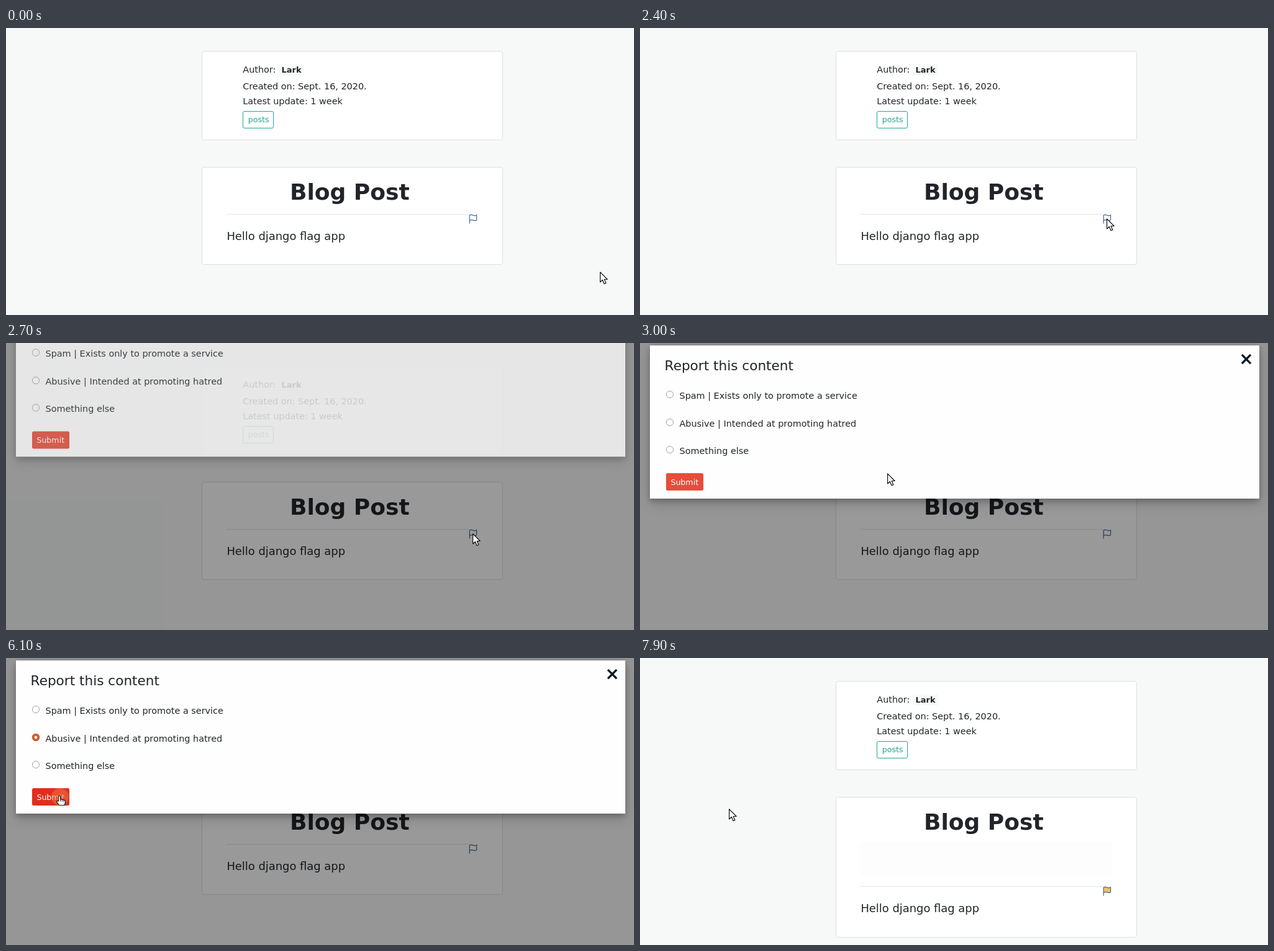
An HTML page for the animation above (8 s loop, 1011 px wide and 463 px high).

```html
<!DOCTYPE html>
<html lang="en">
<head>
<meta charset="utf-8">
<title>Report dialog</title>
<style>
  html, body { margin: 0; width: 100%; height: 100%; overflow: hidden; background: #f7f9f8; }
  svg { display: block; width: 1011px; height: 463px; }
  text { font: 14.4px "DejaVu Sans", sans-serif; fill: #212529; }
  .bold { font-weight: bold; }
  .small { font-size: 12.6px; }
  .card { fill: #fff; stroke: #dfdfdf; }
  .radio { fill: #fff; stroke: #a3a3a3; }
  #sheet { filter: drop-shadow(0 4px 4px rgba(0,0,0,.2)) drop-shadow(0 6px 10px rgba(0,0,0,.19)); }
  #ripple circle { fill: #f07746; }
  #arrow, #hand { fill: #fff; stroke: #111; stroke-linejoin: round; }
</style>
</head>
<body>
<svg viewBox="0 0 1011 463">
  <rect class="card" x="315.5" y="37.5" width="484" height="143" rx="3.5"/>
  <text x="381.3" y="72">Author:</text>
  <rect x="439" y="58" width="41" height="19" rx="3" fill="#f8f9fa"/>
  <text class="bold" x="443.5" y="72" style="font-size:13px">Lark</text>
  <text x="381.2" y="99">Created on: Sept. 16, 2020.</text>
  <text x="381.2" y="123">Latest update: 1 week</text>
  <rect x="381.5" y="134.5" width="49" height="27" rx="2.5" fill="#fff" stroke="#22a593"/>
  <text class="small" x="389.7" y="152" style="fill:#22a593">posts</text>

  <rect class="card" id="post" x="315.5" y="224.5" width="484" height="157" rx="3.5"/>
  <text class="bold" x="649.6" y="277" text-anchor="end" style="font-size:36px">Blog Post</text>
  <rect id="info" x="355" y="297" width="405" height="55" rx="3"/>
  <g id="content">
    <path d="M355 300.5H745" stroke="#e2e4e4"/>
    <path id="flag" d="M746.3 315.5V302C749 300.7 751 301.6 752.5 302.3S756.5 302.6 757.6 301.6V309.8C756 311 754 310.7 752.5 310.1S749 309.2 746.3 310.4"
      fill="none" stroke="#42698f" stroke-width="1.2"/>
    <text x="355.4" y="342" style="font-size:17.9px">Hello django flag app</text>
  </g>

  <rect id="shade" width="1011" height="463" fill="#000" fill-opacity=".4"/>
  <g id="modal">
    <rect id="sheet" x="16" y="4" width="981" height="247" fill="#fefefe"/>
    <text x="39.6" y="44" style="font-size:21.6px">Report this content</text>
    <text class="bold" x="976" y="35" text-anchor="middle" style="font-size:28px;fill:#0b1720">×</text>
    <g id="options"></g>
    <g id="checked">
      <circle cx="48" cy="128" r="6.2" fill="#d0602f"/>
      <circle cx="48" cy="128" r="2.2" fill="#fff"/>
    </g>
    <rect id="focus" x="39.5" y="207.5" width="65" height="33" rx="4" fill="#f2ab9c"/>
    <rect id="submit" x="42" y="210" width="60" height="28" rx="2.5"/>
    <text class="small" x="49.4" y="229" style="fill:#fff">Submit</text>
  </g>

  <g id="ripple"><circle id="ring"/><circle id="disc" r="14"/></g>
  <path id="arrow" d="M.6 .8V17L4.4 13.5L7 19.8L9.8 18.6L7.2 12.5H12.2Z" stroke-width="1.2"/>
  <g id="hand">
    <path d="M-1.5 9V1.8Q-1.5 .5 0 .5T1.5 1.8V6Q3.2 5 4.2 6.5Q5.8 5.6 6.8 7.2Q9.4 6.8 9.4 9.2V12L8 15.5H-.5L-4.2 10.6Q-5 8.4-3 8.5Z" stroke-width="1.2"/>
    <path d="M1.5 6V9.5M4.2 6.5V9.8M6.8 7.2V10" stroke-width=".9"/>
  </g>
</svg>
<script>
const $ = id => document.getElementById(id);
const set = (id, attrs) => { for (const k in attrs) $(id).setAttribute(k, attrs[k]); };
const show = (id, on) => set(id, { visibility: on ? "visible" : "hidden" });
const clamp = v => Math.max(0, Math.min(1, v));
const span = (t, start, end) => clamp((t - start) / (end - start));
const easeOut = (k, power) => 1 - (1 - k) ** power;

const LOOP = 8000, STEP = 100;
const OPEN = 2500, PICK = 4500, FOCUS = 6800, CLOSE = 7800;
const PRESSES = [1700, 4200, 6100], RIPPLE = 650;

// The pointer glides to each place in turn.
const HOME = { x: 956, y: 393 };
const GLIDES = [
  { start: 0, end: 1200, x: 750, y: 311 },
  { start: 1300, end: 1700, x: 751, y: 307 },
  { start: 2700, end: 3400, x: 130, y: 136 },
  { start: 3500, end: 3800, x: 48, y: 129 },
  { start: 5100, end: 5700, x: 86, y: 222 },
  { start: FOCUS, end: 7000, x: 92, y: 225 },
  { start: 7200, end: 7900, x: 143, y: 243 }
];

$("options").innerHTML = [
  "Spam | Exists only to promote a service",
  "Abusive | Intended at promoting hatred",
  "Something else"
].map((label, i) => {
  const y = Math.round(83 + 44.6 * i);
  return `<circle class="radio" cx="48" cy="${y}" r="5.6"/><text x="63.5" y="${y + 7}">${label}</text>`;
}).join("");

function pointerAt(t) {
  let { x, y } = HOME;
  for (const g of GLIDES) {
    const k = easeOut(span(t, g.start, g.end), 1.5);
    x += (g.x - x) * k;
    y += (g.y - y) * k;
  }
  return { x: Math.round(x), y: Math.round(y) };
}

function drawRipple(t, x, y) {
  const press = PRESSES.find(p => t >= p && t < p + RIPPLE);
  show("ripple", press);
  if (!press) return;
  const age = t - press, k = age / RIPPLE;
  set("ripple", { transform: `translate(${x + 1} ${y + 2})` });
  set("ring", { r: 14 + 30 * easeOut(k, 1.7), "fill-opacity": .5 * clamp((1 - k) * 1.45) });
  set("disc", { "fill-opacity": age > 0 && age < 300 ? .5 : 0 });
}

function draw(t) {
  const open = t >= OPEN && t < CLOSE, flagged = t >= CLOSE;
  const slide = easeOut(span(t, OPEN, OPEN + 400), 2.15);
  const { x, y } = pointerAt(t);
  const over = open && x > 42 && x < 102 && y > 210 && y < 238;

  show("shade", open);
  show("modal", open);
  set("modal", { transform: `translate(0 ${-300 * (1 - slide)})`, opacity: slide });
  show("checked", open && t >= PICK);
  set("submit", { fill: over ? "#e02e1c" : "#e64d3a" });
  set("focus", { opacity: span(t, FOCUS, FOCUS + 200) });

  set("post", { height: flagged ? 226 : 157 });
  set("content", { transform: `translate(0 ${flagged ? 68 : 0})` });
  set("flag", { fill: flagged ? "#f5bd68" : "none" });
  set("info", { "fill-opacity": .009 * span(t, CLOSE, CLOSE + 100) });

  drawRipple(t, x, y);
  show("arrow", !over);
  show("hand", over);
  for (const id of ["arrow", "hand"]) set(id, { transform: `translate(${x} ${y})` });
}

const begin = performance.now();
function frame() {
  const t = (performance.now() - begin) % LOOP;
  draw(Math.floor(t / STEP) * STEP);
  requestAnimationFrame(frame);
}
frame();
</script>
</body>
</html>
```
